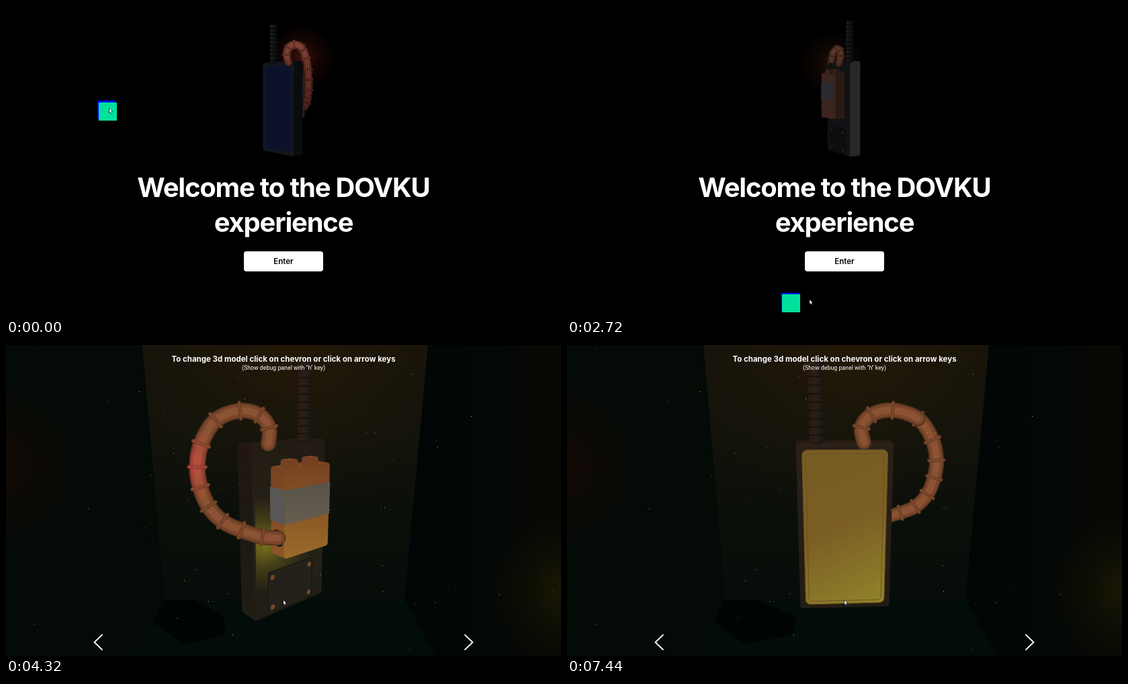
An HTML page with a canvas that plays this animation: 826 by 464 pixels, repeating every 7520 ms.

```html
<!DOCTYPE html>
<html lang="en">
<head>
<meta charset="utf-8">
<title>3D model experience</title>
<style>
html, body { margin: 0; width: 100%; height: 100%; overflow: hidden; background: #000; }
canvas { display: block; }
</style>
</head>
<body>
<canvas id="stage" width="826" height="464"></canvas>
<script>
const ctx = document.getElementById('stage').getContext('2d');
const W = 826, H = 464, LOOP = 7520, STEP = 80, ENTER = 3280;

// Cameras: screen centre, focal length, distance, height shift, pitch in radians
const SMALL = { cx: 411, cy: 123, focal: 616, dist: 1120, lift: 126, pitch: 0 };
const LARGE = { cx: 413, cy: 232, focal: 600, dist: 560, lift: 0, pitch: 14 * Math.PI / 180 };
let cam = SMALL, cos = 1, sin = 0;

const clamp = v => Math.max(0, Math.min(1, v));
const ease = v => { v = clamp(v); return v * v * (3 - 2 * v); };
const mix = (a, b, k) => a.map((v, i) => v + (b[i] - v) * k);
const rgb = (c, a = 1) => `rgba(${c.map(Math.round).join()},${a})`;
const bell = (v, mid, w) => Math.exp(-(((v - mid) / w) ** 2));

function lin(x0, y0, x1, y1, ...stops) {
  const g = ctx.createLinearGradient(x0, y0, x1, y1);
  stops.forEach((c, i) => g.addColorStop(i / (stops.length - 1), c));
  return g;
}
function rad(x, y, r, ...stops) {
  const g = ctx.createRadialGradient(x, y, 0, x, y, r);
  stops.forEach((c, i) => g.addColorStop(i / (stops.length - 1), c));
  return g;
}
const glow = (x, y, r, c, a) => rad(x, y, r, rgb(c, a), rgb(c, a * 0.35), rgb(c, 0));

function poly(pts, fill) {
  ctx.beginPath();
  pts.forEach(p => ctx.lineTo(p[0], p[1]));
  ctx.closePath();
  ctx.fillStyle = fill;
  ctx.fill();
}
function rect(fill, x = 0, y = 0, w = W, h = H) {
  ctx.fillStyle = fill;
  ctx.fillRect(x, y, w, h);
}
function text(str, y, font, spacing, fill = '#fff') {
  ctx.font = font;
  ctx.letterSpacing = spacing + 'px';
  ctx.textAlign = 'center';
  ctx.fillStyle = fill;
  ctx.fillText(str, 413, y);
}

function turn(deg, camera) {
  cam = camera;
  cos = Math.cos(deg * Math.PI / 180);
  sin = Math.sin(deg * Math.PI / 180);
}
// Model space to screen: turn about the vertical axis, then the camera.
function project([x, y, z]) {
  const cp = Math.cos(cam.pitch), sp = Math.sin(cam.pitch);
  const depth = cam.dist - z * cos + x * sin, up = y + cam.lift;
  const k = cam.focal / (depth * cp - up * sp);
  return [cam.cx + (x * cos + z * sin) * k, cam.cy - (up * cp + depth * sp) * k, k];
}

function roundRect(u0, v0, u1, v1, r) {
  const pts = [];
  [[u1 - r, v1 - r], [u0 + r, v1 - r], [u0 + r, v0 + r], [u1 - r, v0 + r]].forEach(([u, v], q) => {
    for (let i = 0; i <= 4; i++) {
      const a = (q + i / 4) * Math.PI / 2;
      pts.push([u + r * Math.cos(a), v + r * Math.sin(a)]);
    }
  });
  return pts;
}

// Fills a flat face if it looks towards the camera.
function face(map, [u0, v0, u1, v1], r, fill, sign, edge) {
  const pts = roundRect(u0, v0, u1, v1, r).map(([u, v]) => project(map(u, v)));
  let area = 0;
  pts.forEach((p, i) => { const q = pts[(i + 1) % pts.length]; area += p[0] * q[1] - q[0] * p[1]; });
  if (area * sign >= 0) return;
  poly(pts, fill);
  if (edge) {
    ctx.lineJoin = 'round';
    ctx.lineWidth = edge === true ? 4 * pts[0][2] : 1;
    ctx.strokeStyle = edge === true ? fill : edge;
    ctx.stroke();
  }
}
const onZ = z => (u, v) => [u, v, z];
const onX = x => (u, v) => [x, v, u];
const onY = y => (u, v) => [u, y, v];

function box(x0, y0, z0, x1, y1, z1, c) {
  face(onY(y1), [x0, z0, x1, z1], 2, c.top, -1, true);
  face(onX(x0), [z0, y0, z1, y1], 2, c.left, 1, true);
  face(onX(x1), [z0, y0, z1, y1], 2, c.right, -1, true);
  face(onZ(z0), [x0, y0, x1, y1], 2, c.back, -1, true);
  face(onZ(z1), [x0, y0, x1, y1], 2, c.front, 1, true);
}

const HOSE = [[27, -57, 0], [23, -36, 3], [36, -19, 7], [64, -13, 11], [98, -24, 15], [118, -52, 18],
  [125, -80, 18], [124, -105, 15], [117, -130, 9], [103, -150, 0], [84, -163, -14], [60, -174, -27], [38, -179, -33]];

function hosePoint(s) {
  const i = Math.min(Math.floor(s), HOSE.length - 2), f = s - i;
  const at = n => HOSE[Math.max(0, Math.min(HOSE.length - 1, n))];
  const [a, b, c, d] = [at(i - 1), at(i), at(i + 1), at(i + 2)];
  return b.map((v, n) => v + f / 2 * (c[n] - a[n] + f * (2 * a[n] - 5 * b[n] + 4 * c[n] - d[n] +
    f * (3 * (b[n] - c[n]) + d[n] - a[n]))));
}

function hose(end, c) {
  const parts = [];
  for (let s = 0; s < end; s += 0.125) {
    parts.push([project(hosePoint(s)), project(hosePoint(Math.min(end, s + 0.14)))]);
  }
  parts.sort((a, b) => a[0][2] - b[0][2]);
  const line = (a, b, w, style) => {
    ctx.beginPath();
    ctx.moveTo(a[0], a[1]);
    ctx.lineTo(b[0], b[1]);
    ctx.lineWidth = w;
    ctx.strokeStyle = style;
    ctx.stroke();
  };
  ctx.lineCap = 'round';
  c.hose.forEach((style, i) => parts.forEach(([a, b]) => line(a, b, [20, 16, 9][i] * a[2], style)));
  for (let i = 1; i < end; i++) {
    const p = project(HOSE[i]), a = project(hosePoint(i - 0.1)), b = project(hosePoint(i + 0.1));
    const n = Math.hypot(b[0] - a[0], b[1] - a[1]) || 1;
    const ring = (r, w, style) => {
      const dx = (a[1] - b[1]) / n * r * p[2], dy = (b[0] - a[0]) / n * r * p[2];
      line([p[0] - dx, p[1] - dy], [p[0] + dx, p[1] + dy], w * p[2], style);
    };
    ring(10.5, 4.5, c.hose[0]);
    ring(10, 3.2, c.hose[1]);
  }
  ctx.lineCap = 'butt';
}

function antenna(c) {
  for (let y = -57; y < 50; y += 11) {
    const [x0, y0, k] = project([-39, y, 0]), y1 = project([-39, y + 11, 0])[1], r = 9.5 * k;
    rect(c.gap, x0 - r + 1, y1, 2 * r - 2, y0 - y1 + 1);
    rect(lin(x0 - r, 0, x0 + r, 0, ...c.rod), x0 - r, y1 + 1.5 * k, 2 * r, y0 - y1 - 2 * k);
  }
}

function body(c) {
  box(-64, -298, -15, 64, -57, 15, c.body);
  face(onZ(17), [-58, -293, 58, -65], 7, c.panel, 1, c.trim);
  face(onZ(17.5), [-53, -288, 53, -70], 5, 'rgba(0,0,0,0)', 1, c.trim);
  face(onX(66), [-15, -298, 15, -57], 2, c.sideGlow, -1);
  face(onZ(-17), [-64, -298, 64, -57], 3, c.backGlow, -1);
  face(onZ(-17), [-43, -297, 43, -233], 3, c.plate, -1, c.gap);
  for (const u of [-36, 36]) for (const v of [-288, -242]) {
    face(onZ(-18), [u - 4, v - 4, u + 4, v + 4], 4, c.screw, -1);
  }
}

function battery(c) {
  box(-42, -203, -46, 36, -86, -19, c.cell);
  for (const u of [-20, 18]) box(u - 7, -86, -39, u + 7, -77, -26, c.cell);
  face(onX(38.5), [-48, -157, -17, -111], 0, c.tapeSide, -1);
  face(onZ(-48.5), [-44, -157, 38, -111], 0, c.tape, -1);
  // Socket where the hose enters
  face(onX(38.8), [-45, -191, -21, -167], 12, c.gap, -1);
}

function model(c) {
  const steps = cos >= 0 ? [battery, 12, body, antenna, 4]
    : sin < 0 ? [body, antenna, battery, 12]
    : [12, body, antenna, 4, battery];
  steps.forEach(s => typeof s === 'number' ? hose(s, c) : s(c));
}

function smallLook(k) {
  const hot = mix([168, 82, 68], [122, 72, 52], k);
  const dark = '#0d1114', none = 'rgba(0,0,0,0)';
  const cell = { top: '#4a2c22', left: '#3c241c', right: '#4a2c22', back: '#54342a', front: dark };
  // The hose fades towards its lower end
  const fade = v => lin(0, 50, 0, 150, rgb(hot.map(n => n * v)), rgb(hot.map(n => n * v * 0.6)));
  return {
    body: { top: '#24272c', left: '#38383b', right: dark, back: '#18191d', front: '#1e2126' },
    panel: '#101938', trim: '#161f40', sideGlow: none, backGlow: none, plate: '#131417', screw: '#4a3026',
    gap: '#08090b', rod: ['#24272a', '#15181b', '#0c0e10'], cell, tape: '#3c3c44', tapeSide: '#30303a',
    hose: [0.55, 0.85, 1.05].map(fade)
  };
}

function roomLook(deg) {
  const k = clamp((deg + 51) / 54);
  const wood = (a, b) => lin(0, 170, 0, 320, a, b);
  const red = (a, b) => rad(268, 180, 120, a, b, b);
  const side = project([66, -200, 2]), back = project([50, -190, -17]);
  return {
    body: {
      top: '#261a12', left: '#1a1612', right: lin(0, 140, 0, 410, '#24150f', '#1c1913', '#211d14'),
      back: lin(0, 140, 0, 410, '#211b13', '#272217', '#1f1d15'), front: lin(0, 140, 0, 400, '#2a2018', '#221c14')
    },
    panel: lin(355, 155, 470, 390, rgb(mix([135, 60, 18], [118, 92, 36], k)),
      rgb(mix([126, 62, 15], [124, 95, 36], k)), rgb(mix([118, 70, 14], [146, 134, 44], k))),
    trim: rgb(mix([118, 70, 24], [108, 80, 32], k)),
    sideGlow: glow(side[0], side[1], 45, [190, 180, 44], bell(deg, -45, 27)),
    backGlow: glow(back[0], back[1], 70, [150, 140, 30], 0.75 * bell(deg, -139, 30)),
    plate: '#23211a', screw: '#74472a', gap: '#17120c',
    rod: ['#2e1811', '#28211a', '#1a1610'],
    cell: {
      top: '#7f4825', left: '#6c3e22', right: wood('#744122', '#8e5628'),
      back: wood('#763f20', '#9a6c2a'), front: '#53301b'
    },
    tape: lin(0, 205, 0, 270, '#57534a', '#675d4e'), tapeSide: '#595653',
    hose: [red('#85302a', '#593620'), red('#b0443b', '#7a462a'), red('#c64d43', '#8b5233')]
  };
}

// Pointer path on the welcome page: time, x, y
const PATH = [[0, 154, 153], [400, 590, 205], [800, 604, 358], [1150, 215, 290], [1400, 330, 298],
  [1600, 403, 382], [1950, 590, 290], [2250, 215, 330], [2600, 242, 440], [2900, 540, 436], [3200, 413, 381]];

function pointerAt(t) {
  t = Math.max(0, t);
  const i = PATH.findIndex(p => p[0] > t);
  if (i < 0) return PATH[PATH.length - 1].slice(1);
  const a = PATH[i - 1], b = PATH[i];
  return mix(a, b, (t - a[0]) / (b[0] - a[0])).slice(1);
}
function arrow(x, y) {
  poly([[x - 0.7, y - 1], [x - 0.7, y + 7], [x + 1.2, y + 5.6], [x + 2.6, y + 8], [x + 3.8, y + 7.3], [x + 2.6, y + 5], [x + 5, y + 4.8]], '#000');
  poly([[x, y], [x, y + 6], [x + 1.5, y + 4.7], [x + 2.6, y + 7], [x + 3.4, y + 6.6], [x + 2.4, y + 4.3], [x + 4, y + 4.2]], '#fff');
}
function hand(x, y) {
  poly([[x - 1, y], [x + 1, y], [x + 1, y + 3], [x + 5, y + 4], [x + 5, y + 8], [x + 3, y + 11], [x - 1, y + 11], [x - 4, y + 6], [x - 1, y + 7]], '#222');
  poly([[x - 0.4, y + 1], [x + 0.4, y + 1], [x + 0.6, y + 4], [x + 4, y + 5], [x + 4, y + 8], [x + 2.5, y + 10], [x - 0.6, y + 10], [x - 2.5, y + 7], [x - 0.4, y + 8]], '#fff');
}

const tile = document.createElement('canvas');
tile.width = tile.height = 40;
const tileCtx = tile.getContext('2d');

// Coloured square trailing the pointer, inverting what lies below it
function follower(t) {
  const [x, y] = pointerAt(t - 25), b = Math.cos(t * Math.PI / 1600);
  tileCtx.clearRect(0, 0, 40, 40);
  tileCtx.fillStyle = '#00f';
  tileCtx.fillRect(5 - b, 5 - 2 * b, 27, 27);
  tileCtx.fillStyle = '#00e19c';
  tileCtx.fillRect(6, 6, 27, 27);
  ctx.globalCompositeOperation = 'difference';
  ctx.drawImage(tile, Math.round(x - 22), Math.round(y - 15));
  ctx.globalCompositeOperation = 'source-over';
}

function welcome(t) {
  const k = clamp(t / 1600);
  turn(-52 + 0.062 * t, SMALL);
  const [x, y] = project(HOSE[4]);
  rect(glow(x, y + 15, 50, mix([190, 50, 30], [120, 55, 22], k), 0.4), x - 60, y - 45, 120, 120);
  model(smallLook(k));
  for (let y = 22; y < 228; y += 2) rect('rgba(0,0,0,.45)', 340, y, 146, 1);
  for (let x = 340; x < 486; x += 3) rect('rgba(0,0,0,.25)', x, 80, 1, 145);

  const title = '700 40px Inter, sans-serif';
  text('Welcome to the DOVKU', 285, title, -1.2);
  text('experience', 337, title, -1.2);
  ctx.beginPath();
  ctx.roundRect(354, 366, 118, 30, 4);
  ctx.fillStyle = '#fff';
  ctx.fill();
  text('Enter', 385, '600 11.5px Inter, sans-serif', 0, '#000');
  follower(t);
  const [px, py] = pointerAt(t);
  const over = px > 354 && px < 472 && py > 366 && py < 396;
  (over ? hand : arrow)(px, py);
}

const DUST = [42,5, 150,84, 198,69, 235,101, 122,244, 206,272, 215,194, 249,161, 271,230, 296,153, 218,292,
  281,335, 265,351, 254,407, 301,382, 307,382, 331,371, 337,432, 346,206, 355,80, 345,47, 413,294, 482,246,
  461,341, 468,342, 493,358, 536,131, 548,131, 576,170, 604,43, 640,143, 642,152, 692,106, 558,242, 563,242,
  577,227, 560,329, 560,367, 608,385, 638,384, 658,360, 601,454, 734,372, 813,365, 42,416, 316,215];
const EARLY_DUST = [431,192, 492,232, 260,228, 162,406, 703,131, 700,105];

function dust(list, alpha) {
  for (let i = 0; i < list.length; i += 2) {
    rect(rgb([205, 195, 145], alpha * (0.4 + 0.13 * (i % 5))), list[i], list[i + 1], 1, 1);
  }
}

function chevron(x, dir) {
  ctx.beginPath();
  ctx.moveTo(x, 432);
  ctx.lineTo(x + dir * 12, 443.5);
  ctx.lineTo(x, 455);
  ctx.lineWidth = 1.8;
  ctx.lineJoin = 'miter';
  ctx.strokeStyle = '#fff';
  ctx.stroke();
}

function room(t) {
  const e = ease((t - 3440) / 640), deg = 3 + 0.0455 * (t - 7440);
  const bl = mix([160, 86], [236, 380], e), br = mix([668, 86], [593, 380], e);
  const fl = mix([-8, 464], [197, 464], e), fr = mix([834, 464], [640, 464], e);
  turn(deg, LARGE);

  ctx.globalAlpha = e;
  rect('#040a06');
  rect(glow(-10, 180, 130, [40, 8, 5], 0.5));
  poly([[628, 0], br, fr, [W, H], [W, 0]], lin(600, 0, 800, 0, '#010506', '#030706', '#060804'));
  rect(glow(835, 365, 120, [40, 36, 5], 0.6));
  const wall = [[203, 0], bl, br, [628, 0]];
  poly(wall, lin(0, 0, 0, 380, '#17130a', '#13130b', '#0b0f09', '#060d09'));
  poly(wall, glow(430, -10, 260, [54, 32, 5], 0.45));

  ctx.globalAlpha = ease((t - 3200) / 240);
  const floor = [bl, br, fr, fl];
  poly(floor, '#020c0b');
  ctx.globalAlpha *= 1 - e;
  poly(floor, rad(413, 470, 470, '#3b230a', '#291d0a', '#1a170a', '#12130a', '#0c1109', '#030e0c'));

  ctx.globalAlpha = e;
  const w = 70 * Math.abs(cos);
  poly([[233, 381], [280, 380], [272 + w, 405], [300 + w / 2, 432], [266, 447], [220, 414]], 'rgba(0,3,4,.8)');

  ctx.globalAlpha = ease((t - 3700) / 380);
  ctx.save();
  ctx.translate(0, -150 * (1 - e));
  model(roomLook(deg));
  ctx.restore();

  ctx.globalAlpha = 1;
  dust(EARLY_DUST, 1 - e);
  dust(DUST, e);
  if (t >= 4000) {
    text('To change 3d model click on chevron or click on arrow keys', 24.5, '700 11.5px Inter, sans-serif', 0);
    text('(Show debug panel with "h" key)', 37, '400 8.8px Roboto, sans-serif', 0);
    chevron(143.5, -1);
    chevron(682.5, 1);
  }
  arrow(413, 381);
}

function draw(now) {
  const t = Math.floor(now % LOOP / STEP) * STEP;
  ctx.globalAlpha = 1;
  rect('#000');
  t < ENTER ? welcome(t) : room(t);
  requestAnimationFrame(draw);
}
draw(0);
</script>
</body>
</html>
```
